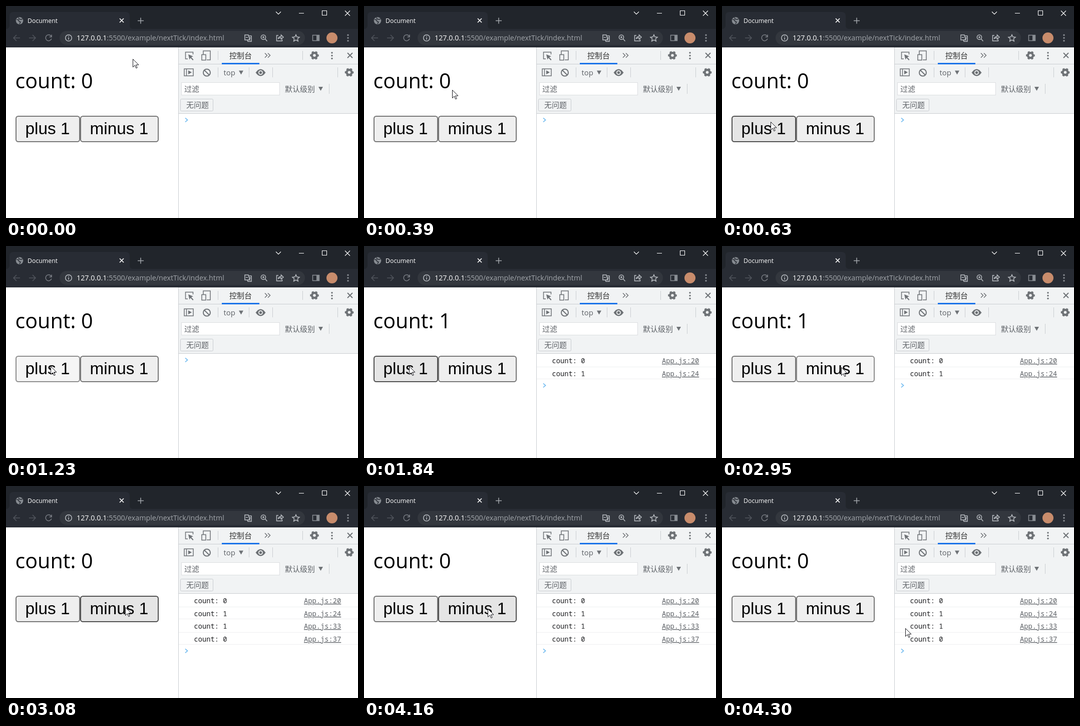
These frames come from a looping animation (703 by 425 pixels, 4.33 s). An HTML page:

```html
<!DOCTYPE html>
<html lang="zh-CN">
<head>
<meta charset="utf-8">
<title>Document</title>
<style>
  html, body { margin: 0; width: 100%; height: 100%; overflow: hidden; background: #fff; }
  svg { display: block; }
  text { font-family: "Open Sans", "Noto Sans", sans-serif; white-space: pre; }
  .line { fill: none; stroke-width: 1.5; }
  .cjk text { font: 15px "Noto Sans CJK SC", "Noto Sans CJK", sans-serif; fill: #5f6368; }
  .log text { font: 13.75px "Noto Sans Mono", "DejaVu Sans Mono", monospace; fill: #202124; }
  .log .link { fill: #5f6368; text-decoration: underline; }
  .button text { font: 33.333px "Liberation Sans", Arial, sans-serif; }
  .button rect { fill: #efefef; stroke: #767676; stroke-width: 2; }
  .button.hover rect { fill: #e5e5e5; stroke: #4f4f4f; }
  .button.press rect { fill: #f5f5f5; stroke: #8d8d8d; }
</style>
</head>
<body>
<svg width="703" height="425" viewBox="0 0 703 425">
  <defs>
    <g id="gear" fill="none" stroke="#6e7276">
      <circle r="5" stroke-width="4.4"/>
      <circle r="7.6" stroke-width="2.4" stroke-dasharray="4.2 3.76" stroke-dashoffset="2.1"/>
    </g>
    <g id="dots"><circle cy="-5.7" r="1.7"/><circle r="1.7"/><circle cy="5.7" r="1.7"/></g>
  </defs>

  <!-- browser frame -->
  <rect width="703" height="83" fill="#21252b"/>
  <path d="M0 46q7 0 7-7V20q0-8 8-8H239q8 0 8 8V39q0 7 7 7H703V83H0z" fill="#282c34"/>
  <rect x="107" y="50" width="490" height="28" rx="14" fill="#33373e"/>
  <circle cx="27" cy="29.500" r="7.3" fill="#858a90"/>
  <path d="M21 27l4 1 1 3 3 1-2 4M25 23l1 3 4 1 3-1" class="line" stroke="#282c34" stroke-width="2"/>
  <text x="43" y="34" font-size="12.3" fill="#fff">Document</text>
  <g class="line" stroke="#fff">
    <path d="M227 25l8 8m0-8l-8 8" stroke-width="1.7"/>
    <path d="M539 11.500l5 5 5-5M585 14.500h10M631.500 9.500h9v9h-9zM677 9.500l10 10m0-10l-10 10" stroke-width="1.1"/>
  </g>
  <path d="M263 29.500h12m-6-6v12" class="line" stroke="#a4a8ad"/>
  <path d="M28 64H15m6-6l-6 6 6 6M46 64h13m-6-6l6 6-6 6" class="line" stroke="#50545c"/>
  <path d="M90.500 61a6 6 0 1 0 .4 4.500M91 57.500v4.500h-4.500" class="line" stroke="#7b7f86"/>
  <g class="line" stroke="#b9bdc2" stroke-width="1.3">
    <circle cx="125" cy="64" r="6.300"/>
    <path d="M125 63v4.500M125 60v1.500"/>
    <path d="M477 58h7l3 10h-10zM484 60h6v11h-7l-1-3M479 63h4M485 64h4m-2-1q0 3-2 4"/>
    <circle cx="514" cy="62.500" r="4.600"/>
    <path d="M517.500 66l4 4.500M512 62.500h4m-2-2v4"/>
    <path d="M544 59h-3.500v11h11v-3M543.500 66q1-5 6-5v-3l4.500 4.500-4.500 4v-3q-4 0-6 2.500z"/>
    <path d="M579 57.500l2 4.500 5 .5-3.700 3.300 1 4.700-4.300-2.500-4.300 2.500 1-4.700-3.700-3.300 5-.5z"/>
    <path d="M612.500 58.500h13v11h-13z" stroke="#888d93"/>
  </g>
  <path d="M620 58h6v12h-6z" fill="#888d93"/>
  <circle cx="651" cy="64" r="11" fill="#c88c6c"/>
  <use href="#dots" x="683" y="64" fill="#888d93"/>
  <text x="141" y="69" font-size="14.28" fill="#a2a6ab"><tspan fill="#fff">127.0.0.1</tspan>:5500/example/nextTick/index.html</text>

  <!-- page -->
  <text id="count" x="18.500" y="165" font-size="41.300"></text>
  <g id="plus" class="button">
    <rect x="20" y="221" width="127" height="51" rx="4.500"/><text x="38.500" y="257">plus 1</text>
  </g>
  <g id="minus" class="button">
    <rect x="149" y="221" width="155" height="51" rx="4.500"/><text x="167.500" y="257">minus 1</text>
  </g>

  <!-- developer tools -->
  <rect x="345" y="83" width="358" height="132" fill="#f1f3f4"/>
  <path d="M344.500 83V425M345 116.500H703M345 215.500H703M423.500 90v18M592.500 90v18M423.500 123v20M485.500 123v20M532.500 123v20M662.500 123v20M645.500 156v20" stroke="#cacdd1" fill="none"/>
  <rect x="431" y="114" width="75" height="3" fill="#1a73e8"/>
  <rect x="350.500" y="153.500" width="196" height="25" fill="#fff" stroke="#dcdee0"/>
  <rect x="348.500" y="186.500" width="65" height="24" rx="2" fill="#f1f3f4" stroke="#c8cbcf"/>
  <g class="line" stroke="#6e7276">
    <path d="M363 106h-4.500V92.500h15V97"/>
    <path d="M364 97l10 4-4 1.500 4.500 5-1.500 1.500-4.500-5-2 3.500z" fill="#6e7276" stroke="none"/>
    <path d="M394 97v-7h14v18h-7M391 97.500h8v11h-8z"/>
    <path d="M517 94.500l4.500 4.500-4.500 4.500M523 94.500l4.500 4.500-4.500 4.500"/>
    <path d="M682 94l10 10m0-10l-10 10" stroke-width="2"/>
    <path d="M356 126h18v14h-18zM360.500 126v14"/>
    <circle cx="401" cy="133.500" r="7" stroke-width="2"/>
    <path d="M396 128.500l10 10" stroke-width="2"/>
  </g>
  <g fill="#6e7276">
    <path d="M364 129l7 4-7 4zM465 129.500h9l-4.500 8zM624 162h9l-4.500 8z"/>
    <path d="M498.500 133.500q10-14 20 0-10 14-20 0z"/>
    <use href="#dots" x="651" y="99.500"/>
  </g>
  <circle cx="508.500" cy="133.500" r="3.600" fill="#6e7276" stroke="#f1f3f4" stroke-width="1.700"/>
  <use href="#gear" x="616" y="99"/>
  <use href="#gear" x="685.500" y="133"/>
  <text x="434.500" y="139" font-size="15" fill="#5f6368">top</text>
  <g class="cjk">
    <text x="446" y="105" style="fill:#333">控制台</text>
    <text x="356" y="172">过滤</text>
    <text x="557" y="172">默认级别</text>
    <text x="360" y="204">无问题</text>
  </g>
  <g id="logs" class="log"></g>
  <path id="prompt" d="M358 -4l4.500 4-4.500 4" class="line" stroke="#5fb3ee" stroke-width="1.700"/>

  <path id="cursor" d="M.5 .5V16.500l3.800-3.600 2.600 5.800 2.300-1-2.600-5.700h5.400z" fill="#fff" stroke="#16161c"/>
</svg>
<script>
const $ = id => document.getElementById(id);
const LOOP = 4330;

// start, end, from x, from y, to x, to y
const moves = [
  [120, 630, 253, 106, 97, 232],
  [650, 800, 97, 232, 89, 241],
  [1810, 2340, 89, 241, 236, 243],
  [2410, 2470, 236, 243, 238, 243],
  [4130, 4300, 238, 243, 366, 285],
];
// press, release, console output
const clicks = { plus: [1230, 1280, 1330], minus: [2950, 3030, 3080] };

const logs = [[0, 20], [1, 24], [1, 33], [0, 37]];
const lineBottoms = [242.5, 266.5, 293.5, 317.5];
$('logs').innerHTML = logs.map(([value, line], i) => {
  const y = [235, 261, 286, 312][i];
  return `<g><text x="375.5" y="${y}">count: ${value}</text>
    <text class="link" x="595" y="${y}">App.js:${line}</text>
    <path d="M345 ${lineBottoms[i]}H703" stroke="#eeeff0"/></g>`;
}).join('');

function cursorAt(t) {
  const [start, end, x0, y0, x1, y1] = moves.filter(m => t >= m[0]).pop() || moves[0];
  const stepped = Math.floor(Math.max(0, t - start) / 30) * 30;
  const p = t >= end ? 1 : stepped / (end - start);
  const eased = p * p * (2.6 - 1.6 * p);
  return [Math.round(x0 + (x1 - x0) * eased), Math.round(y0 + (y1 - y0) * eased)];
}

function setButton(id, left, right, x, y, t) {
  const [press, release] = clicks[id];
  const hover = x >= left && x < right && y >= 220 && y < 273;
  const state = t >= press && t < release ? 'press' : hover ? 'hover' : '';
  $(id).setAttribute('class', 'button ' + state);
}

function draw(t) {
  const [x, y] = cursorAt(t);
  $('cursor').setAttribute('transform', `translate(${x} ${y})`);
  setButton('plus', 19, 148, x, y, t);
  setButton('minus', 148, 305, x, y, t);

  const { plus, minus } = clicks;
  $('count').textContent = 'count: ' + (t >= plus[1] && t < minus[1] ? 1 : 0);
  const shown = t >= minus[2] ? 4 : t >= plus[2] ? 2 : 0;
  [...$('logs').children].forEach((row, i) => row.setAttribute('visibility', i < shown ? 'visible' : 'hidden'));
  $('prompt').setAttribute('transform', `translate(0 ${shown ? lineBottoms[shown - 1] + 13 : 228.5})`);
}

const begin = performance.now();
function tick() {
  draw((performance.now() - begin) % LOOP);
  requestAnimationFrame(tick);
}
tick();
</script>
</body>
</html>
```
